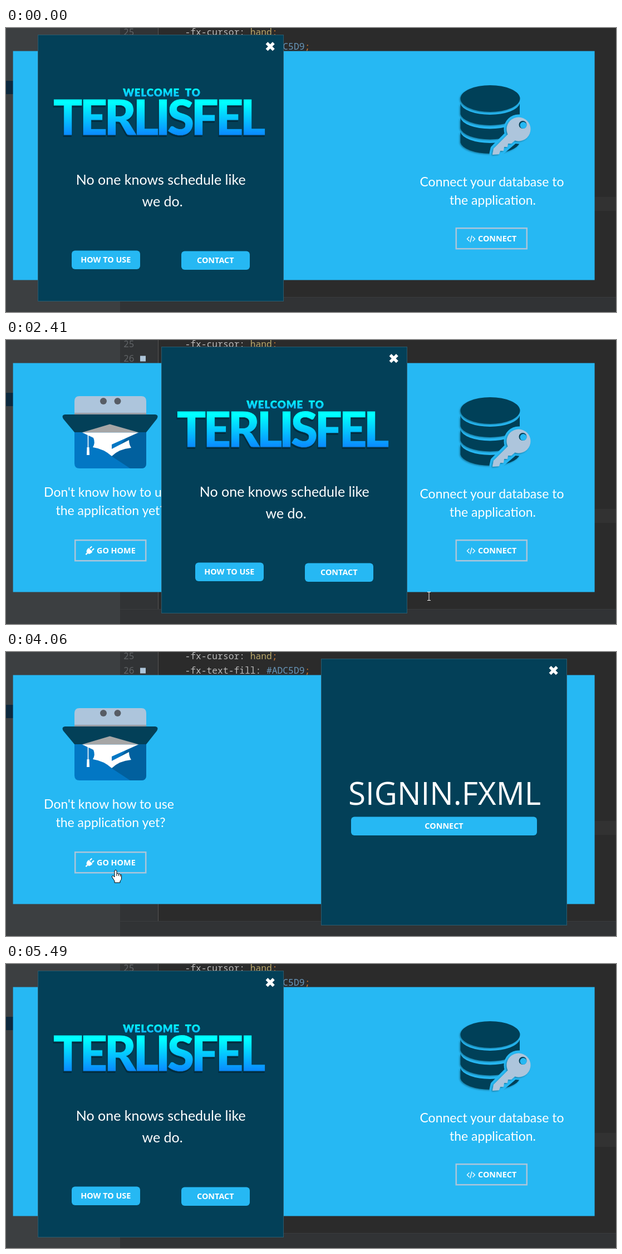
Animation of 1096x511 px, one loop 7.18 s. Source, as an HTML page:

```html
<!DOCTYPE html>
<html lang="en">
<head>
<meta charset="utf-8">
<title>Sliding panel</title>
<style>
  html, body { margin: 0; height: 100%; overflow: hidden; background: #2b2b2b; }
  svg { display: block; width: 100vw; height: 100vh; }
  text { fill: #fff; white-space: pre; }
  .mid { text-anchor: middle; }
  .code { font: 16.3px "Noto Sans Mono", "DejaVu Sans Mono", monospace; fill: #bababa; }
  .num { fill: #606366; }
  .copy { font: 23px Lato, sans-serif; text-anchor: middle; }
  .big { font-size: 25px; }
  .label { font: bold 14.4px "Open Sans", "Noto Sans", sans-serif; }
  .sign { font: 56.5px "Open Sans", sans-serif; }
  .hello { font: 900 18.5px Lato, sans-serif; letter-spacing: 1px; word-spacing: 5px; }
  .brand { font: 900 88.5px Lato, sans-serif; letter-spacing: -6.3px; }
  .navy { fill: #034058; }
  .sky { fill: #26b8f3; }
  .steel { fill: #adc5dc; }
  .frame { fill: none; stroke: #adc5d9; stroke-width: 2.5; }
  .line { fill: none; stroke: #fff; }
  .cursor { fill: #fff; stroke: #000; stroke-linejoin: round; }
</style>
</head>
<body>
<svg viewBox="0 0 1096 511" preserveAspectRatio="none">
  <defs>
    <linearGradient id="glow" gradientUnits="userSpaceOnUse" x1="0" y1="128" x2="0" y2="194">
      <stop offset=".1" stop-color="#00ffff"/><stop offset="1" stop-color="#0a86ff"/>
    </linearGradient>
    <linearGradient id="glowSmall" gradientUnits="userSpaceOnUse" x1="0" y1="108" x2="0" y2="124">
      <stop offset="0" stop-color="#00ffff"/><stop offset="1" stop-color="#10b4ff"/>
    </linearGradient>
    <filter id="shade" x="-20%" y="-20%" width="140%" height="140%">
      <feDropShadow dx="-1.5" dy="1.5" stdDeviation="1" flood-color="#023" flood-opacity=".4"/>
    </filter>
    <path id="disc" d="M816.5 136A53.5 22 0 0 0 923 136V155A53.5 22 0 0 1 816.5 155Z"/>
  </defs>

  <!-- editor -->
  <path fill="#3c3f41" d="M0 0H205V511H0Z"/>
  <path fill="#0d293e" d="M0 95H205V119H0Z"/>
  <path fill="#313335" d="M205 0H273V511H205Z"/>
  <path fill="#323232" d="M274 304H1096V329H274Z"/>
  <path fill="#555" d="M273 0H274V485H273Z"/>
  <path fill="#313335" d="M205 485H1096V511H205Z"/>
  <path fill="#3a3c3e" d="M205 484H1096V485H205Z"/>
  <text class="code num" x="211" y="13">25</text>
  <text class="code num" x="211" y="38.5">26</text>
  <path fill="#adc5d9" d="M241 28.5H251V38.5H241Z"/>
  <text class="code" x="321.5" y="13">-fx-cursor: <tspan fill="#b9a86b">hand</tspan><tspan fill="#cc7832">;</tspan></text>
  <text class="code" x="321.5" y="38.5">-fx-text-fill: <tspan fill="#6897bb">#ADC5D9</tspan><tspan fill="#cc7832">;</tspan></text>

  <!-- wide card -->
  <path class="sky" d="M12.6 41.6H1057.6V453.6H12.6Z"/>

  <path class="steel" d="M123 134V110Q123 101 132 101H243Q252 101 252 110V134Z"/>
  <path fill="#989da5" d="M123 131H252V134H123Z"/>
  <g fill="#575d66"><circle cx="175" cy="110" r="6"/><circle cx="200.5" cy="110" r="6"/></g>
  <path fill="#0277c4" d="M123 166H252V222Q252 231 243 231H132Q123 231 123 222Z"/>
  <path fill="#01609e" d="M225 166H252V222Q252 231 243 231H223L188 208Z"/>
  <path class="navy" d="M106 134H268Q275 135 271 142L252 166H123L103 142Q99 135 106 134Z"/>
  <path fill="#a6a6a6" d="M136 166.5L186.5 151.5L239 166.5Z"/>
  <path fill="#fff" d="M137 166.5H238L190 188V196L221 180Q221 188 225 194Q203 196 190 209Q176 196 156 193Q161 185 157 176Z"/>
  <path class="line" stroke-width="1.6" d="M147.5 169V194"/>
  <path fill="#fff" d="M145.5 193H149.5L150 207H145Z"/>
  <text class="copy" x="185" y="282">Don't know how to use</text>
  <text class="copy" x="188" y="315">the application yet?</text>
  <rect class="frame" x="124.2" y="360.2" width="127" height="37"/>
  <g transform="translate(150.5 379) rotate(45)" fill="#fff">
    <path d="M-5 -2H5V1Q4 6 1.2 6V10H-1.2V6Q-4 6 -5 1Z"/>
    <path d="M-3.8 -8H-1.6V-3H-3.8ZM1.6 -8H3.8V-3H1.6Z"/>
  </g>
  <text class="label" x="163" y="384">GO HOME</text>

  <g class="navy" filter="url(#shade)">
    <ellipse cx="870" cy="127" rx="53.5" ry="24"/>
    <use href="#disc"/><use href="#disc" y="25.5"/><use href="#disc" y="51"/>
  </g>
  <g stroke="#26b8f3" stroke-width="11" stroke-linejoin="round" class="sky">
    <circle cx="921" cy="182" r="21"/>
    <path d="M905 188L876 217L874 226L886 226L914 202Z"/>
  </g>
  <g class="steel" filter="url(#shade)">
    <path d="M905 188L876 217L874 228L886 227L888 221L894 221L895 214L901 214L902 208L908 208L917 200Z"/>
    <circle cx="921" cy="182" r="21.5"/>
  </g>
  <circle class="navy" cx="928.5" cy="174" r="7"/><circle class="sky" cx="929.5" cy="175" r="6"/>
  <text class="copy" x="873" y="285">Connect your database to</text>
  <text class="copy" x="874.5" y="317.5">the application.</text>
  <rect class="frame" x="808.8" y="360.2" width="127" height="37"/>
  <path class="line" stroke-width="1.3" d="M832.5 375.5L828.5 379.5L832.5 383.5M838.5 375.5L842.5 379.5L838.5 383.5M837 373.5L834 385.5"/>
  <text class="label" x="848" y="384">CONNECT</text>

  <!-- sliding panel, drawn from its own left edge -->
  <g id="panel">
    <rect class="navy" x=".5" y="12.5" width="441" height="479" stroke="#2b5b6e"/>
    <path class="line" stroke-width="5.4" d="M411.5 27L423.9 39.4M423.9 27L411.5 39.4"/>
    <g id="welcome">
      <text class="hello mid" x="223" y="123" style="fill:url(#glowSmall);stroke:url(#glowSmall);stroke-width:.5">WELCOME TO</text>
      <text class="brand mid" x="214.5" y="196" style="fill:#022c3f">TERLISFEL</text>
      <text class="brand mid" x="215.5" y="193" style="fill:url(#glow);stroke:#034058;stroke-width:.8">TERLISFEL</text>
      <text class="copy big" x="221.2" y="282">No one knows schedule like</text>
      <text class="copy big" x="224" y="321">we do.</text>
      <rect class="sky" x="61" y="400.5" width="123" height="33.5" rx="6"/>
      <text class="label mid" x="122.3" y="421.5">HOW TO USE</text>
      <rect class="sky" x="258" y="401.5" width="123" height="33.5" rx="6"/>
      <text class="label mid" x="319.3" y="422.5">CONTACT</text>
    </g>
    <g id="signin">
      <text class="sign mid" x="222" y="274.5">SIGNIN.FXML</text>
      <rect class="sky" x="54" y="296.5" width="334" height="33.5" rx="6"/>
      <text class="label mid" x="221" y="317.5">CONNECT</text>
    </g>
  </g>

  <g id="arrow" class="cursor"><path d="M0 0V16.5L4 13L6.5 19L9.3 18L6.8 12H11.8Z"/></g>
  <g id="beam"><path class="line" stroke="#ddd" d="M-3 -7.5H3M-3 7.5H3M0 -7.5V7.5"/></g>
  <g id="hand" class="cursor">
    <path d="M-2 1.5Q0 -1 2 1.5V7Q4 5.5 5.5 7.5Q7.5 6.5 8.5 8.5Q10.5 8 10.5 10V16Q10 19 8 20V23H-2V20L-6.5 13Q-7 10.5 -4.5 10.5L-2 13Z"/>
    <path fill="none" d="M2 7V11M5.5 7.5V11M8.5 8.5V12"/>
  </g>
</svg>
<script>
const LOOP = 7180, LEFT = 57, RIGHT = 566, WIDTH = 442;
const $ = id => document.getElementById(id);
const show = (id, on) => { $(id).style.display = on ? '' : 'none'; };

// The picture refreshes only at these moments and holds in between.
const steps = (from, to, n) =>
  Array.from({ length: n }, (_, i) => Math.round((from + (to - from) * i / (n - 1)) / 10) * 10);
const ticks = [
  0, ...steps(70, 130, 2), ...steps(360, 1070, 10), 1140, 1230, 1300, 1380,
  ...steps(1550, 2180, 9), 2270, 2340, 2410, 2500, 2580, 2650, 2730, 2810, 2880,
  ...steps(3110, 3750, 9), ...steps(3830, 4060, 4),
  4680, 4770, 4860, 4950, 5010, 5090, 5170, 5240, 5320, 5400, 5490
];

// Keys are [time, value, ...]; column picks the value.
function track(keys, t, column = 1) {
  const next = keys.findIndex(k => k[0] > t);
  if (next === 0) return keys[0][column];
  if (next < 0) return keys[keys.length - 1][column];
  const a = keys[next - 1], b = keys[next];
  return a[column] + (b[column] - a[column]) * (t - a[0]) / (b[0] - a[0]);
}

// Constant speed with short acceleration and braking ramps.
const ease = u => u < .2 ? 3.125 * u * u : u > .8 ? 1 - 3.125 * (1 - u) ** 2 : 1.25 * u - .125;

const there = [[2114, 0], [2180, .094], [2410, .449], [2730, .857], [2835, 1]];
const back = [[4746, 0], [5446, 1]];
const pointer = [
  [69, 818, 540], [70, 818, 497], [130, 705, 465], [360, 640, 474], [520, 480, 481],
  [780, 223, 457], [900, 250, 464], [1070, 406, 475], [1140, 469, 476], [1380, 841, 422],
  [1630, 874, 384], [2180, 874, 384], [2270, 858, 402], [2410, 760, 461], [2730, 444, 506],
  [2880, 434, 484], [3750, 241, 431], [4060, 197, 392], [4680, 197, 394],
  [4950, 225, 442], [5170, 232, 540]
];

function cursorAt(x, y, panel) {
  const onButton = y > 359 && y < 399 && (x > 123 && x < 253 || x > 808 && x < 937);
  const onPanel = x > panel && x < panel + WIDTH;
  if (onButton) return 'hand';
  return y > 454 && y < 485 && x > 274 && !onPanel ? 'beam' : 'arrow';
}

function draw(now) {
  const time = now % LOOP;
  const t = ticks.filter(k => k <= time).pop();
  const panel = LEFT + (RIGHT - LEFT) * (ease(track(there, t)) - ease(track(back, t)));
  $('panel').setAttribute('transform', `translate(${Math.round(panel)})`);
  const signing = t >= 2880 && t < 5490;
  show('signin', signing);
  show('welcome', !signing);

  const x = track(pointer, t), y = track(pointer, t, 2);
  const kind = cursorAt(x, y, panel);
  for (const id of ['arrow', 'beam', 'hand']) show(id, id === kind);
  $(kind).setAttribute('transform', `translate(${x} ${y})`);
  requestAnimationFrame(() => draw(performance.now()));
}
draw(performance.now());
</script>
</body>
</html>
```
